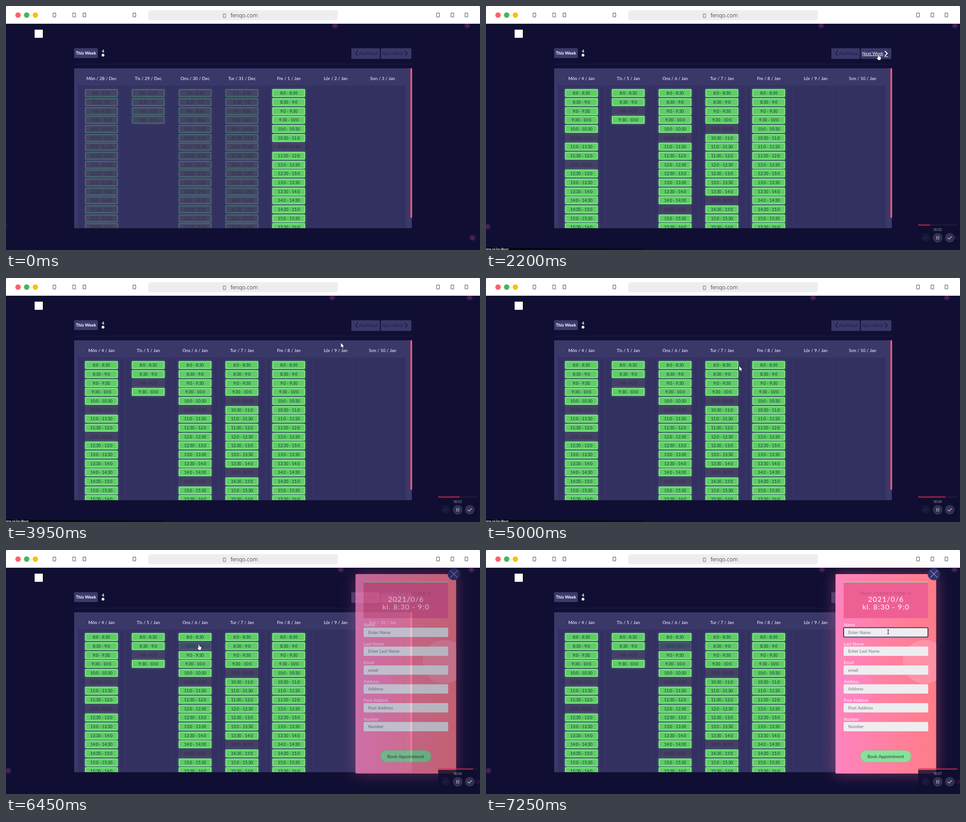
An HTML page with a canvas for the animation above (7.3 s loop, 1043 px wide and 537 px high).

```html
<!DOCTYPE html>
<html lang="sv">
<head>
<meta charset="utf-8">
<title>Booking calendar</title>
<style>
html, body { margin: 0; width: 100%; height: 100%; overflow: hidden; background: #100f33; }
canvas { display: block; }
</style>
</head>
<body>
<canvas id="stage" width="1043" height="537"></canvas>
<script>
const W = 1043, H = 537, LOOP = 7300, STEP = 50;
const FONT = 'Lato, "Open Sans", sans-serif';
const main = document.getElementById('stage').getContext('2d');
const layer = document.createElement('canvas');
layer.width = W;
layer.height = H;
const modal = layer.getContext('2d');
let c = main;

const WEEK_AT = 2100, PICK_AT = 5850, FOCUS_AT = 7050;
const DAYS = ['Mön', 'Tis', 'Ons', 'Tur', 'Fre', 'Lör', 'Son'];
const BOOKED = [{ Fre: [6] }, { Mön: [5, 8], Tis: [2], Ons: [5, 13], Tur: [4, 12] }];
const FIELDS = [['Name', 'Enter Name'], ['Last Name', 'Enter Last Name'], ['Email', 'email'],
  ['Address', 'Address'], ['Post Address', 'Post Address'], ['Number', 'Number']];
const SLOT_STYLE = {
  free: { fill: '#5ece64', edge: '#88e78c', ink: '#17323a', glow: 'rgba(105,225,125,.75)' },
  past: { fill: '#444463', edge: '#486a70', ink: '#2b2b4d', glow: 'rgba(75,150,120,.3)' },
  booked: { fill: '#443f63', edge: '#484369', ink: '#2d2a4e', glow: 'transparent' },
  picked: { fill: '#404d68', edge: '#456070', ink: '#2a3a4e', glow: 'transparent' }
};
const MOVES = [
  { from: 350, to: 1050, x: 863, y: 107, shape: hand },
  { from: 3200, to: 4900, x: 557, y: 194, shape: arrow },
  { from: 5100, to: 5600, x: 424, y: 208, shape: hand },
  { from: 6500, to: FOCUS_AT, x: 885, y: 180, shape: beam }
];

const clamp = v => Math.max(0, Math.min(1, v));
const within = (t, a, b) => t >= a && t < b;
const smooth = p => p * p * (3 - 2 * p);

function box(x, y, w, h, fill, r = 0) {
  c.fillStyle = fill;
  c.beginPath();
  c.roundRect(x, y, w, h, r);
  c.fill();
}

function frame(x, y, w, h, color, width, r = 0) {
  c.strokeStyle = color;
  c.lineWidth = width;
  c.beginPath();
  c.roundRect(x, y, w, h, r);
  c.stroke();
}

function disc(x, y, r, fill) {
  c.fillStyle = fill;
  c.beginPath();
  c.arc(x, y, r, 0, 7);
  c.fill();
}

function line(points, color, width) {
  c.strokeStyle = color;
  c.lineWidth = width;
  c.beginPath();
  points.forEach(([x, y]) => c.lineTo(x, y));
  c.stroke();
}

function cross(x, y, r, color, width) {
  line([[x - r, y - r], [x + r, y + r]], color, width);
  line([[x + r, y - r], [x - r, y + r]], color, width);
}

function clipTo(x, y, w, h, paint) {
  c.save();
  c.beginPath();
  c.rect(x, y, w, h);
  c.clip();
  paint();
  c.restore();
}

function glowing(color, blur, paint) {
  c.save();
  c.shadowColor = color;
  c.shadowBlur = blur;
  paint();
  c.restore();
}

function text(s, x, y, size, color, { weight = 400, align = 'center', space = 0, font = FONT } = {}) {
  c.font = `${weight} ${size}px ${font}`;
  c.letterSpacing = space + 'px';
  c.textAlign = align;
  c.textBaseline = 'alphabetic';
  c.fillStyle = color;
  c.fillText(s, x, y + size * 0.36);
}

function chrome() {
  box(0, 0, W, 39, '#ddd');
  box(0, 0, W, 39, '#fff', [6, 6, 0, 0]);
  ['#ff5f73', '#43b854', '#ffbd08'].forEach((color, i) => disc(26.5 + i * 19, 20, 6, color));
  box(313, 9, 417, 22.5, '#eee', 5);
  for (const x of [106.5, 150, 172.5, 282.5, 950.5, 982, 1013]) frame(x - 3, 15.5, 6, 8.5, '#444', 1);
  frame(478, 17.5, 5, 8, '#666', 1);
  text('fenqo.com', 494, 21, 12, '#555', { align: 'left', font: '"Open Sans", sans-serif' });
}

// Each particle drifts back and forth on one shared slow swing.
function particle(t, x, y, reach, peak) {
  x += reach * Math.cos((t - peak) / 5400 * 2 * Math.PI);
  const g = c.createRadialGradient(x, y, 2, x, y, 8);
  g.addColorStop(0, 'rgba(112,42,105,.65)');
  g.addColorStop(0.5, 'rgba(92,36,95,.55)');
  g.addColorStop(1, 'rgba(80,30,90,0)');
  disc(x, y, 8, g);
}

function particles(t) {
  particle(t, 728, 43, 11.5, 1650);
  particle(t, 1023, 43, 9, 2300);
  particle(t, -3, 485.5, 9, 1500);
  particle(t, 1028, 510, 8, 1500);
}

function chevron(x, dir, color) {
  line([[x - 3 * dir, 99], [x + 2.5 * dir, 104.5], [x - 3 * dir, 110]], color, 2);
}

function toolbar(t) {
  const hover = within(t, MOVES[0].to, MOVES[1].from), dim = '#1f1d49', next = hover ? '#fff' : dim;
  box(63, 52, 18, 18, '#fff');
  box(150, 93, 52, 21.5, '#3b3a6e', 2);
  text('This Week', 176, 104, 9.5, '#fff', { weight: 700 });
  text('4', 213.5, 100, 9.5, '#fff', { weight: 700 });
  disc(213.5, 108.3, 3, '#fff');
  box(760, 93, 62.5, 23.5, '#3a3869', 2);
  box(824.5, 93, 67.5, 23.5, '#3a3869', 2);
  chevron(771.5, -1, dim);
  text('Pre Week', 797.5, 105, 9.5, dim);
  text('Next Week', 851, 105, 9.5, next);
  chevron(880.5, 1, next);
  if (hover) {
    box(828.5, 109, 45.5, 1, '#fff');
    box(876.5, 111, 8.5, 1, '#fff');
  }
  box(150, 127.5, 743, 1, '#25234d');
}

const hour = n => `${n >> 1}:${n % 2 ? 30 : 0}`;

function slot(cx, row, kind) {
  const x = Math.round(cx - 36), y = Math.round(183.2 + row * 19.68);
  const { fill, edge, ink, glow } = SLOT_STYLE[kind];
  glowing(glow, 4, () => box(x, y, 72, 17, edge, 1));
  box(x + 2, y + 2, 68, 13, fill);
  text(`${hour(16 + row)} - ${hour(17 + row)}`, cx, y + 8.6, 8.9, ink);
}

function slotKind(t, week, i, row) {
  if (!week && i < 4) return 'past';
  if (BOOKED[week][DAYS[i]]?.includes(row)) return 'booked';
  return t >= PICK_AT && i === 2 && row === 1 ? 'picked' : 'free';
}

function dateLabel(week, i) {
  const day = 28 + i + week * 7;
  return day > 31 ? `${day - 31} / Jan` : `${day} / Dec`;
}

function calendar(t) {
  const week = t >= WEEK_AT ? 1 : 0;
  box(150, 137, 743, 352, '#3a3869', 2);
  box(159, 175, 721, 314, '#333161');
  box(890, 137, 3.5, 329, '#fc5b83', 1);
  clipTo(150, 137, 743, 352, () => DAYS.forEach((day, i) => {
    const cx = 210 + i * 103.1;
    text(`${day} / ${dateLabel(week, i)}`, cx, 160, 9.7, '#fff');
    if (i && t >= STEP) box(Math.round(158.6 + i * 103.2), 176, 1, 313, '#3c3a6a');
    const rows = i > 4 ? 0 : i === 1 ? 4 : 16;
    for (let row = 0; row < rows; row++) slot(cx, row, slotKind(t, week, i, row));
  }));
}

function form(t) {
  const g = c.createLinearGradient(769, 0, 991, 0);
  g.addColorStop(0, '#ff84c0');
  g.addColorStop(1, '#ff7c86');
  glowing('rgba(255,95,150,.42)', 32, () => box(769, 53, 221.5, 439, g, 2));
  clipTo(769, 53, 221.5, 439, () => {
    disc(965, 246, 48, 'rgba(255,165,195,.5)');
    disc(810, 303, 42, 'rgba(255,135,210,.35)');
  });

  box(787, 70, 186, 80, '#ee6094');
  box(787, 69.5, 186, 2, '#a9cf91');
  text('Your chosen time is', 879.5, 94.5, 11.5, 'rgba(120,40,95,.4)', { space: 0.9 });
  text('2021/0/6', 880, 108.5, 16, '#fff', { space: 1.1 });
  text('kl. 8:30 - 9:0', 880, 125.3, 16, '#fff', { space: 1.1 });

  FIELDS.forEach(([label, hint], i) => {
    const y = 171 + i * 41.5;
    text(label, 787, y - 6, 9.5, '#fff', { align: 'left' });
    box(787, y, 186, 20.5, '#efedf0', 2);
    if (!i && t >= FOCUS_AT) frame(787, y, 185.5, 20.5, '#20204b', 1.7, 2);
    text(hint, 797, y + 10.5, 9.5, '#77727f', { align: 'left' });
  });

  box(824, 441, 111.5, 26, '#79d68c', 13);
  box(825, 442, 109.5, 24, '#87e298', 12);
  text('Book Appointment', 879.5, 454.3, 9.7, '#253c48');

  disc(985.5, 53, 13.5, '#30326c');
  cross(985.5, 53, 8, '#dcdcea', 1);
}

function overlay(t) {
  const alpha = clamp((t - 6000) / 600);
  if (!alpha) return;
  c = modal;
  c.clearRect(0, 0, W, H);
  form(t);
  c = main;
  c.globalAlpha = alpha;
  c.drawImage(layer, 0, 0);
  c.globalAlpha = 1;
}

function recorder(t) {
  c.save();
  c.globalAlpha = clamp(t / 300);
  box(951, 484, 88, 43, 'rgba(15,14,46,.82)');
  box(951, 480.5, 87, 3, 'rgba(70,45,75,.3)');
  box(951, 480.5, 87 * t / LOOP, 3, 'rgba(255,40,85,.55)');
  const sec = Math.max(0, Math.floor((t - STEP) / 1000));
  text(`00:0${sec}`, 994, 492, 7, '#a3a2b3');
  disc(967.5, 510, 10, '#17163a');
  cross(967.5, 510, 3, '#38364f', 1);
  disc(994, 510, 10.5, '#303052');
  box(991.3, 506, 1.5, 8, '#b6b5c4');
  box(995.2, 506, 1.5, 8, '#b6b5c4');
  disc(1020.5, 510, 10.5, '#332f52');
  line([[1016, 510], [1019, 513], [1025, 507]], '#c2c0ce', 1.3);
  c.restore();
}

function status(t) {
  if (!within(t, 1400, 2600) && !within(t, 3100, 5600)) return;
  const g = c.createLinearGradient(0, 0, 345, 0);
  g.addColorStop(0, 'rgba(0,0,0,.75)');
  g.addColorStop(1, 'rgba(0,0,0,.25)');
  box(0, 532, 345, 5, g);
  text('ntar på localhost', 0, 536, 6.7, '#fff', { align: 'left', weight: 700 });
}

function outlined(path) {
  const shape = new Path2D(path);
  c.lineJoin = 'round';
  c.strokeStyle = '#15152f';
  c.lineWidth = 1.6;
  c.stroke(shape);
  c.fillStyle = '#fff';
  c.fill(shape);
}

function arrow() {
  outlined('M0 0v10l2.3-2 1.7 3.5 1.5-.7-1.5-3.4 3-.2z');
}

function hand() {
  outlined('M-.6 0h1.6l.5 4 4 1 .5 3.2-1.5 3.8h-4.2l-3.3-4.5.7-1.1 1.9 1.2z');
}

function beam() {
  line([[0, -4.5], [0, 4.5]], '#26263c', 1.2);
  for (const y of [-4.5, 4.5]) line([[-2, y], [2, y]], '#26263c', 1);
}

function pointer(t) {
  if (t < MOVES[0].from) return;
  let x = 985, y = 503, shape = arrow;
  for (const move of MOVES) {
    const p = smooth(clamp((t - move.from) / (move.to - move.from)));
    x += (move.x - x) * p;
    y += (move.y - y) * p;
    if (p === 1) shape = move.shape;
    else if (p > 0) shape = arrow;
  }
  c.save();
  c.translate(x, y);
  shape();
  c.restore();
}

function draw(t) {
  box(0, 0, W, H, '#100f33');
  particles(t);
  chrome();
  toolbar(t);
  calendar(t);
  overlay(t);
  recorder(t);
  status(t);
  pointer(t);
}

const start = performance.now();
function tick() {
  const t = (performance.now() - start) % LOOP;
  draw(Math.floor(t / STEP) * STEP);
  requestAnimationFrame(tick);
}
tick();
</script>
</body>
</html>
```
